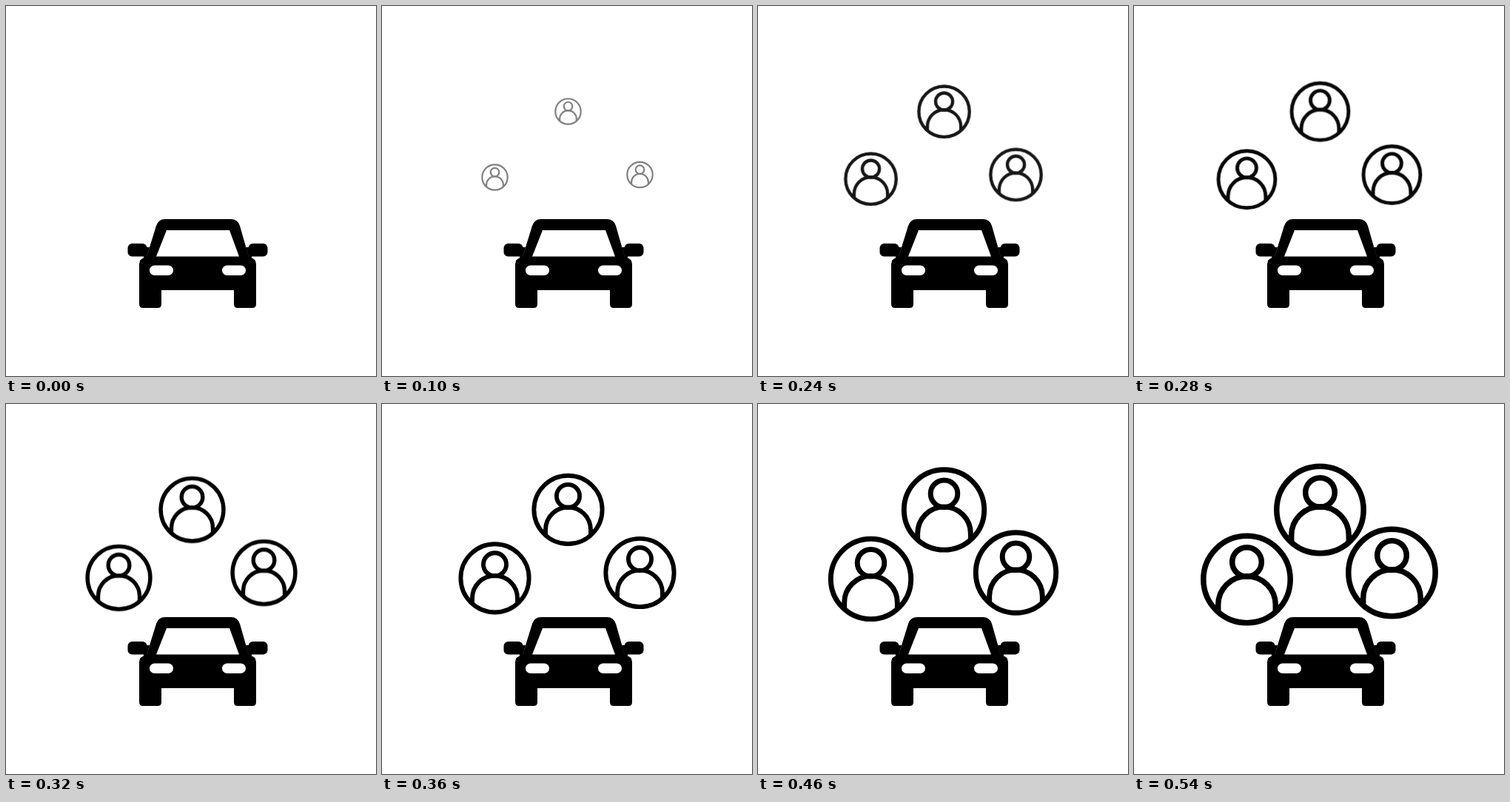
An HTML page that plays this animation: 500x500 px, repeating every 0.9 s.

```html
<!DOCTYPE html>
<html lang="en">
<head>
<meta charset="utf-8">
<title>Car and riders</title>
<style>
  html, body { margin: 0; width: 100%; height: 100%; overflow: hidden; background: #fff; }
  svg { display: block; width: 100vw; height: 100vh; }
  .line { fill: none; stroke: #000; stroke-width: 7.5; }
</style>
</head>
<body>
<svg viewBox="0 0 500 500">
  <defs>
    <g id="rider" class="line">
      <circle r="58.7"/>
      <circle cy="-23.5" r="19.8"/>
      <path d="M-38.8 44V34.5a38.8 38.8 0 0 1 77.6 0V44"/>
    </g>
  </defs>

  <g id="car">
    <path fill-rule="evenodd" d="M190 339 203 297Q206 288 215 288H304Q313 288 316 297L328 339Q338 341 338 349V403Q338 408 333 408H313Q308 408 308 403V384H210V403Q210 408 205 408H185Q180 408 180 403V349Q180 341 190 339ZM217 303 203 338.5H315L302 303Z"/>
    <rect x="164.5" y="321" width="26" height="17.5" rx="6"/>
    <rect x="327.5" y="321" width="26" height="17.5" rx="6"/>
    <path d="M184 326H194L190 340H186ZM334 326H324L328 340H332Z"/>
    <g fill="#fff">
      <rect x="194" y="350.5" width="32" height="13.5" rx="6.75"/>
      <rect x="292" y="350.5" width="32" height="13.5" rx="6.75"/>
    </g>
  </g>

  <g id="riders">
    <use href="#rider"/>
    <use href="#rider"/>
    <use href="#rider"/>
  </g>
</svg>
<script>
  const LOOP = 900, STEP = 20, END = 540, FADE = 340;
  // resting centre and downward drift while growing
  const spots = [
    { x: 152.5, y: 229.2, drift: 7.8 },
    { x: 251.5, y: 142.3, drift: 0.7 },
    { x: 348.5, y: 228, drift: 0 }
  ];
  const group = document.getElementById('riders');
  const riders = [...group.children];

  function scaleAt(t) {
    if (t >= END) return 1;
    const u = t + 20;
    return Math.min(1, u * (0.002615 - 1.44e-6 * u));
  }

  function opacityAt(t) {
    const left = 1 - Math.min(1, t / FADE);
    return 1 - left * left;
  }

  function draw(now) {
    const t = Math.floor((now % LOOP) / STEP) * STEP;
    const s = scaleAt(t);
    group.setAttribute('opacity', opacityAt(t));
    riders.forEach((el, i) => {
      const { x, y, drift } = spots[i];
      el.setAttribute('transform', `translate(${x} ${y + drift * s}) scale(${s})`);
    });
  }

  const start = performance.now();
  function tick() {
    draw(performance.now() - start);
    requestAnimationFrame(tick);
  }
  tick();
</script>
</body>
</html>
```
